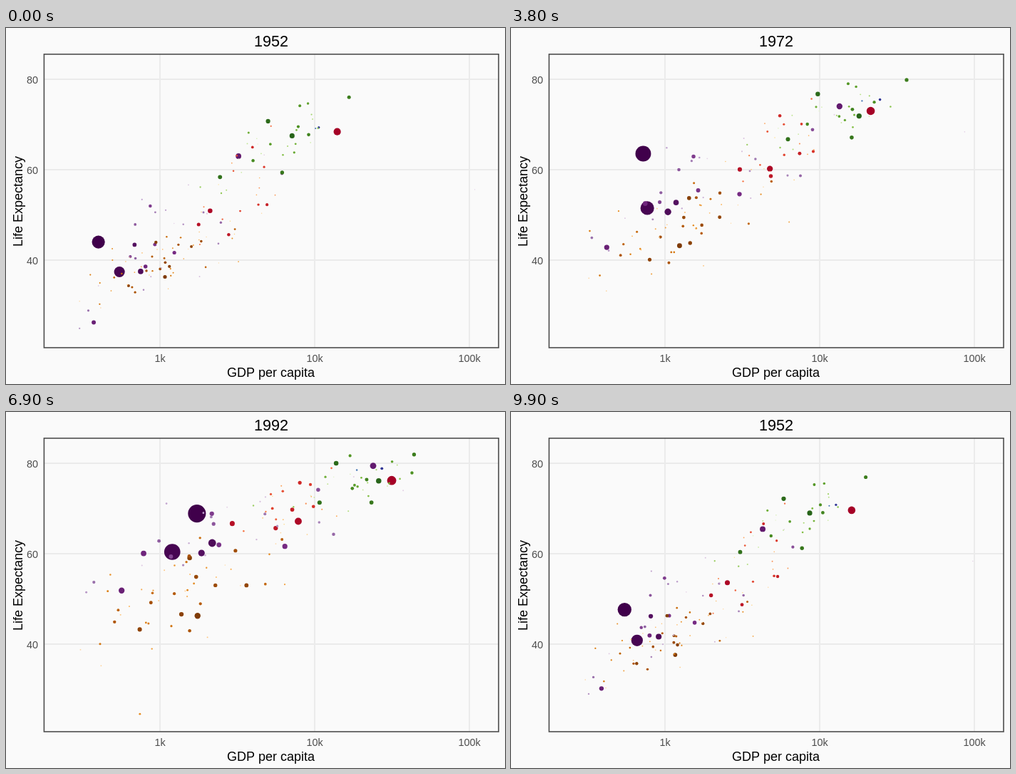
Animation of 700x500 px, one loop 10000 ms. Source, as an HTML page with a canvas:

```html
<!DOCTYPE html>
<html lang="en">
<head>
<meta charset="utf-8">
<title>Life expectancy and GDP</title>
<style>
html, body { margin: 0; width: 100%; height: 100%; overflow: hidden; background: #fafafa; }
canvas { display: block; }
</style>
</head>
<body>
<canvas id="stage" width="700" height="500"></canvas>
<script>
const ctx = document.getElementById('stage').getContext('2d');
const STATES = 12, LAST = STATES - 1;
const STEPS = [9, 8, 9, 9, 8, 9, 8, 8, 8, 8, 8, 8];
const dots = [];

const mix = (a, b, t) => a + (b - a) * t;
const xOf = logGdp => 216 + 217 * (logGdp - 3);
const yOf = life => 326 - 6.35 * (life - 40);

let seed = 2024;
const rand = () => (seed = seed * 16807 % 2147483647) / 2147483647;
const spread = () => (rand() + rand() + rand() - 1.5) * 2;

// Large populations are dark, small ones pale.
function shade(ramp, t) {
  const p = t * (ramp.length - 1), i = Math.min(Math.floor(p), ramp.length - 2);
  const part = (hex, c) => parseInt(hex.substr(c * 2, 2), 16);
  return `rgb(${[0, 1, 2].map(c => Math.round(mix(part(ramp[i], c), part(ramp[i + 1], c), p - i)))})`;
}

// place(state) gives [log10 of GDP, life expectancy]; populations are in millions.
function addDot(color, popStart, popEnd, place) {
  const at = [];
  for (let s = 0; s < STATES; s++) {
    const [logGdp, life] = place(s);
    const size = mix(Math.sqrt(popStart), Math.sqrt(popEnd), s / LAST);
    at.push({ x: xOf(logGdp), y: yOf(life), r: 0.5 + 0.365 * size });
  }
  dots.push({ color, at });
}

// A prominent dot follows key points of [state, GDP, life].
function lead(land, rank, popStart, popEnd, ...keys) {
  addDot(shade(land.ramp, rank / (land.count - 1)), popStart, popEnd, s => {
    let k = 0;
    while (k < keys.length - 2 && s >= keys[k + 1][0]) k++;
    const [s0, g0, l0] = keys[k], [s1, g1, l1] = keys[k + 1], t = (s - s0) / (s1 - s0);
    return [mix(Math.log10(g0), Math.log10(g1), t), mix(l0, l1, t)];
  });
}

// The other dots drift with their cloud: mean and deviation of log GDP, then of life.
function crowd({ ramp, count, leads, pop, decay, growth, from, to }) {
  const locate = ([g, gDev, l, lDev], u, v) => [Math.max(2.48, g + gDev * u), l + lDev * v];
  for (let i = 0; i < count - leads; i++) {
    const u = spread(), v = 0.75 * u + 0.6 * spread();
    const start = locate(from, u, v);
    const end = locate(to, 0.9 * u + 0.4 * spread(), 0.9 * v + 0.35 * spread());
    const sway = 0.05 * spread(), people = pop * Math.exp(-i / decay) + 0.2;
    addDot(shade(ramp, (i + leads) / (count - 1)), people, people * growth, s => {
      const p = (s / LAST) ** 0.7;
      return [mix(start[0], end[0], p) + sway * Math.sin(s * 0.9), mix(start[1], end[1], p)];
    });
  }
}

const asia = {
  ramp: ['40004b', '762a83', '9970ab', 'c2a5cf', 'e7d4e8'], count: 33, leads: 6,
  pop: 45, decay: 6, growth: 2.8, from: [3.17, 0.33, 46, 9], to: [3.7, 0.5, 70.5, 6]
};
const europe = {
  ramp: ['276419', '4d9221', '7fbc41', 'b8e186', 'e6f5d0'], count: 30, leads: 1,
  pop: 50, decay: 6, growth: 1.2, from: [3.7, 0.22, 65, 5.5], to: [4.36, 0.23, 77.6, 2.8]
};
const americas = {
  ramp: ['a50026', 'd73027', 'f46d43', 'fdae61', 'fee090'], count: 25, leads: 2,
  pop: 30, decay: 4, growth: 2.8, from: [3.5, 0.22, 53, 8], to: [3.93, 0.25, 73.6, 4]
};
const africa = {
  ramp: ['7f3b08', 'b35806', 'e08214', 'fdb863', 'fee0b6'], count: 52, leads: 2,
  pop: 22, decay: 10, growth: 3.4, from: [2.97, 0.27, 39, 4.7], to: [3.15, 0.4, 54, 8]
};
const oceania = {
  ramp: ['313695', '4575b4'], count: 2, leads: 0,
  pop: 8.5, decay: 0.7, growth: 2.2, from: [4.01, 0.01, 69.2, 0.2], to: [4.47, 0.07, 80.7, 0.5]
};

lead(asia, 0, 556, 1319, [0, 400, 44], [2, 488, 44.5], [3, 613, 58.4], [4, 677, 63.1], [6, 962, 65.5], [8, 1656, 68.7], [11, 4959, 73]);
lead(asia, 1, 372, 1110, [0, 547, 37.4], [3, 701, 47.2], [6, 856, 56.6], [8, 1164, 60.2], [11, 2452, 64.7]);
lead(asia, 2, 82, 224, [0, 750, 37.5], [3, 762, 46], [6, 1517, 56.2], [11, 3541, 70.7]);
lead(asia, 3, 41, 169, [0, 685, 43.4], [6, 1443, 56.2], [11, 2606, 65.5]);
lead(asia, 5, 86, 127, [0, 3217, 63], [3, 9848, 71.4], [6, 19384, 77.1], [11, 31656, 82.6]);
lead(asia, 31, 0.2, 2.5, [0, 108382, 55.6], [4, 109348, 67.7], [6, 31354, 71.3], [11, 47307, 77.6]);
lead(europe, 0, 69, 82, [0, 7144, 67.5], [5, 20513, 72.5], [11, 32170, 79.4]);
lead(americas, 0, 158, 301, [0, 13990, 68.4], [6, 25010, 74.7], [11, 42952, 78.2]);
lead(americas, 1, 57, 190, [0, 2109, 50.9], [3, 3430, 57.6], [6, 7031, 63.3], [11, 9066, 72.4]);
lead(africa, 0, 33, 135, [0, 1077, 36.3], [3, 1015, 41], [6, 1577, 45.8], [11, 2014, 46.9]);
lead(africa, 28, 2.5, 8.9, [0, 493, 40], [7, 848, 44], [8, 737, 23.6], [11, 863, 46.2]);
[asia, europe, americas, africa, oceania].forEach(crowd);
dots.sort((a, b) => b.at[LAST].r - a.at[LAST].r);

function label(text, x, y, size, color, align = 'center') {
  ctx.font = `${size}px "Liberation Sans", Arial, sans-serif`;
  ctx.fillStyle = color;
  ctx.textAlign = align;
  ctx.fillText(text, x, y);
}

function gridLine(x, y, w, h) {
  ctx.fillStyle = '#ebebeb';
  ctx.fillRect(x, y, w, h);
}

function drawAxes() {
  ctx.fillStyle = '#fafafa';
  ctx.fillRect(0, 0, 700, 500);
  ['1k', '10k', '100k'].forEach((name, i) => {
    const x = xOf(3 + i);
    gridLine(x - 1, 37, 2, 412);
    label(name, x, 469, 14.4, '#4d4d4d');
  });
  [80, 60, 40].forEach(life => {
    const y = Math.round(yOf(life));
    gridLine(53, y - 1, 638, 2);
    label(life, 45, y + 6, 14.4, '#4d4d4d', 'right');
  });
  label('GDP per capita', 371.5, 490, 18, '#000');
  ctx.save();
  ctx.translate(23, 243.5);
  ctx.rotate(-Math.PI / 2);
  label('Life Expectancy', 0, 0, 18, '#000');
  ctx.restore();
}

function draw(now) {
  let step = Math.floor(now / 100) % 100, i = 0;
  while (step >= STEPS[i]) step -= STEPS[i++];
  const t = step / STEPS[i], next = (i + 1) % STATES;

  drawAxes();
  for (const { color, at } of dots) {
    const a = at[i], b = at[next];
    ctx.fillStyle = color;
    ctx.beginPath();
    ctx.arc(mix(a.x, b.x, t), mix(a.y, b.y, t), mix(a.r, b.r, t), 0, 7);
    ctx.fill();
  }
  ctx.strokeStyle = '#4d4d4d';
  ctx.lineWidth = 1.6;
  ctx.strokeRect(53.4, 36.8, 637.6, 412.2);
  label(1952 + 5 * (t > 0.56 ? next : i), 372, 26, 21.6, '#000');
}

const start = performance.now();
function loop() {
  draw(performance.now() - start);
  requestAnimationFrame(loop);
}
loop();
</script>
</body>
</html>
```
